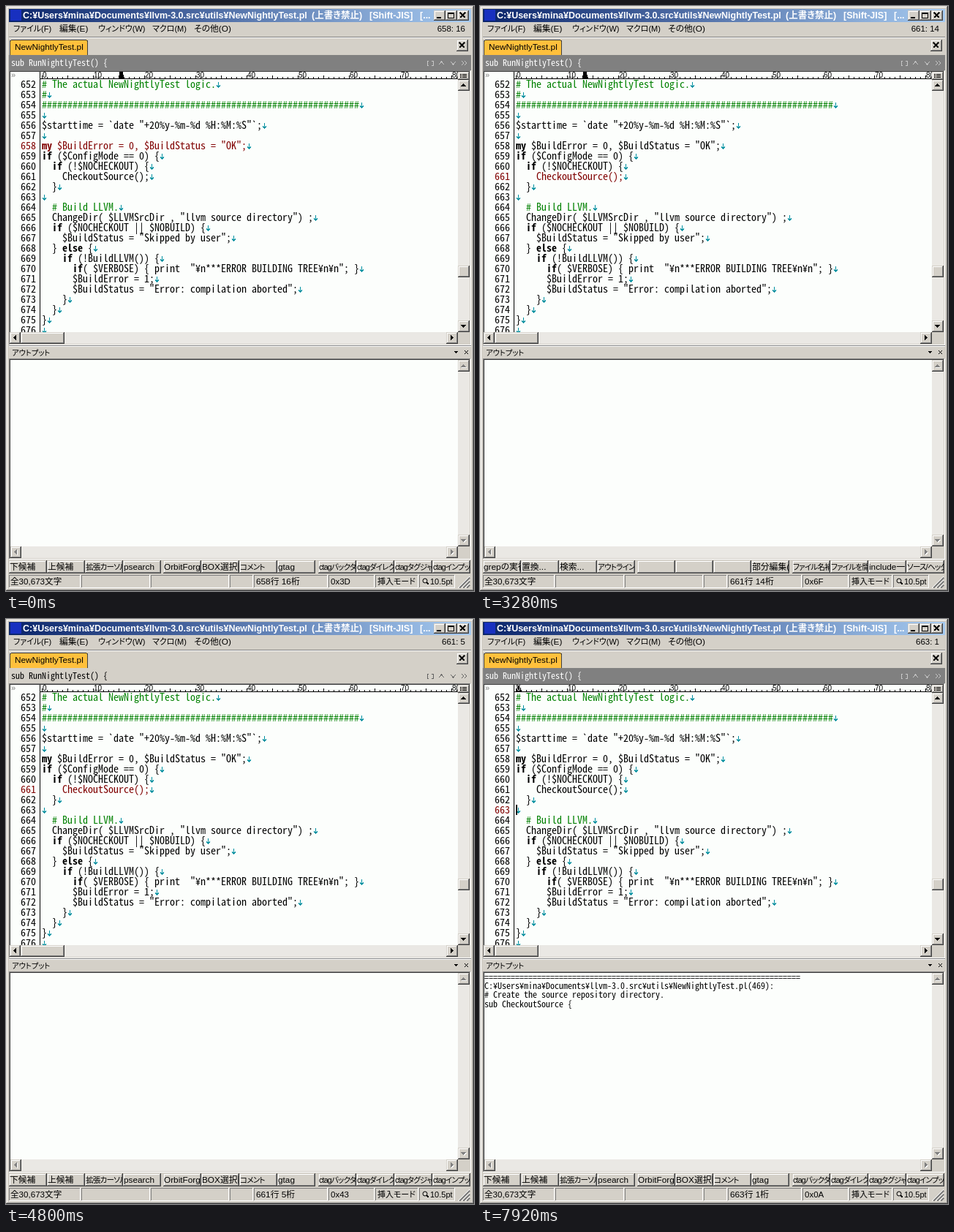
Write an HTML page that moves like this. It is 640 by 800 pixels and loops after 8 s.

```html
<!DOCTYPE html>
<html lang="ja">
<head>
<meta charset="utf-8">
<title>Editor</title>
<style>
html, body { margin: 0; width: 100%; height: 100%; overflow: hidden; background: #d4d0c8; }
svg { display: block; }
#stage { width: 640px; height: 800px; }
rect, path { shape-rendering: crispEdges; }
text { white-space: pre; font: 12px "Liberation Sans", "Noto Sans CJK JP", sans-serif; }
.ja { font-family: "Liberation Sans", "Noto Sans CJK JP", "Noto Sans CJK", sans-serif; font-feature-settings: "palt"; }
.tight { letter-spacing: -.8px; }
.code, .out { font-family: "Noto Sans Mono CJK JP", "Noto Sans Mono", monospace; }
.title { font-weight: bold; fill: #fff; }
.com { fill: #008000; }
.cur { fill: #800000; }
.b { font-weight: bold; }
</style>
</head>
<body>
<svg id="stage" viewBox="0 0 640 800"><g id="base"></g><g id="live"></g></svg>
<script>
const FACE = '#d4d0c8', PAPER = '#fcfefc', DARK = '#404040', MID = '#808080';
const FIRST = 652, TOP = 100, ROW = 14, LEFT = 49, COL = 7;

const CODE = [
  '# The actual NewNightlyTest logic.',
  '#',
  '#'.repeat(62),
  '',
  '$starttime = `date "+20%y-%m-%d %H:%M:%S"`;',
  '',
  'my $BuildError = 0, $BuildStatus = "OK";',
  'if ($ConfigMode == 0) {',
  '  if (!$NOCHECKOUT) {',
  '    CheckoutSource();',
  '  }',
  '',
  '  # Build LLVM.',
  '  ChangeDir( $LLVMSrcDir , "llvm source directory") ;',
  '  if ($NOCHECKOUT || $NOBUILD) {',
  '    $BuildStatus = "Skipped by user";',
  '  } else {',
  '    if (!BuildLLVM()) {',
  '      if( $VERBOSE) { print  "¥n***ERROR BUILDING TREE¥n¥n"; }',
  '      $BuildError = 1;',
  '      $BuildStatus = "Error: compilation aborted";',
  '    }',
  '  }',
  '}',
  ''
];
const FILE = 'C:¥Users¥mina¥Documents¥llvm-3.0.src¥utils¥NewNightlyTest.pl';
const OUTPUT = ['='.repeat(72), FILE + '(469):', '# Create the source repository directory.', 'sub CheckoutSource {'];
const KEYS = ['下候補', '上候補', '拡張カーソル', 'psearch', 'OrbitForg', 'BOX選択開始', 'コメント', 'gtag',
  'ctagバックタグ', 'ctagダイレクト', 'ctagタグジャンプ', 'ctagインプット'];
const CTRL_KEYS = ['grepの実行', '置換...', '検索...', 'アウトライン解析', '', '', '', '部分編集(P)',
  'ファイル名補完', 'ファイルを開く', 'include一覧', 'ソース/ヘッダ'];

// time, line, column, caret, extras: c = Ctrl held, s = selection, u = unfocused, o = output
const STEPS = [
  [0, 658, 16, 0, ''], [480, 658, 16, 1, ''], [1040, 658, 16, 0, ''], [1520, 658, 16, 1, ''],
  [2000, 658, 15, 1, ''], [2240, 658, 14, 1, ''], [2400, 659, 14, 1, ''], [2560, 660, 14, 1, ''],
  [2720, 661, 14, 1, ''], [3280, 661, 14, 0, 'c'], [3440, 661, 5, 1, 'cs'], [3520, 661, 5, 1, 's'],
  [3920, 661, 5, 0, 's'], [4400, 661, 5, 1, 's'], [4560, 661, 5, 1, ''], [4800, 661, 5, 0, 'u'],
  [4880, 661, 5, 0, 'uo'], [5040, 661, 5, 1, 'o'], [5600, 661, 5, 0, 'o'], [6080, 661, 5, 1, 'o'],
  [6640, 661, 5, 0, 'o'], [7040, 661, 5, 1, 'o'], [7600, 661, 5, 0, 'o'], [7680, 662, 4, 1, 'o'],
  [7920, 663, 1, 1, 'o']
];

const box = (x, y, w, h, fill) => `<rect x="${x}" y="${y}" width="${w}" height="${h}" fill="${fill}"/>`;
const path = (d, fill, stroke = 'none', w = 1) => `<path d="${d}" fill="${fill}" stroke="${stroke}" stroke-width="${w}"/>`;
const text = (x, y, s, cls = '', size = 12, fill = '') =>
  `<text x="${x}" y="${y}" class="${cls}" style="font-size:${size}px;${fill && 'fill:' + fill}">${s}</text>`;
const clip = (x, y, w, h, body) =>
  `<svg x="${x}" y="${y}" width="${w}" height="${h}" viewBox="${x} ${y} ${w} ${h}" overflow="hidden">${body}</svg>`;
const edge = (x, y, w, h, tl, br) =>
  box(x, y, w, 1, tl) + box(x, y, 1, h, tl) + box(x, y + h - 1, w, 1, br) + box(x + w - 1, y, 1, h, br);
const raised = (x, y, w, h) => box(x, y, w, h, FACE) +
  edge(x, y, w, h, FACE, DARK) + edge(x + 1, y + 1, w - 2, h - 2, '#fff', MID);
const sunk = (x, y, w, h) => edge(x, y, w, h, MID, '#fff');

// small triangle centred on x, y
const TRI = { u: 'm-4 2h7l-3.5-4z', d: 'm-4-2h7l-3.5 4z', l: 'm2-4v7l-4-3.5z', r: 'm-2-4v7l4-3.5z' };
function scrollButton(x, y, w, h, dir, off) {
  const cx = x + (w >> 1), cy = y + (h >> 1);
  return raised(x, y, w, h) + (off ? path(`M${cx + 1} ${cy + 1}` + TRI[dir], '#fff') : '') +
    path(`M${cx} ${cy}` + TRI[dir], off ? MID : '#000');
}

// sized so that each letter advances adv pixels
let monoRatio = .5;
const mono = (x, y, s, adv, cls, fill) => text(x, y, s, cls, adv / monoRatio, fill);

function frame() {
  let s = box(0, 0, 640, 800, FACE) + edge(0, 0, 640, 800, FACE, DARK) + edge(1, 1, 638, 798, '#fff', MID);
  s += '<defs><linearGradient id="bar"><stop stop-color="#0a246a"/><stop offset="1" stop-color="#a6caf0"/></linearGradient></defs>';
  s += box(4, 4, 632, 18, 'url(#bar)') + box(6, 5, 15, 15, '#1830c0');
  s += text(23, 17, FILE, 'title', 12.5) + text(418, 17, '(上書き禁止)', 'title ja', 12.5) +
    text(497, 17, '[Shift-JIS]', 'title', 12.6) + text(566, 17, '[...', 'title', 12.5);
  s += raised(585, 6, 16, 14) + raised(601, 6, 16, 14) + raised(617, 6, 16, 14);
  s += box(589, 15, 6, 2, '#000') + path('M604.5 9.5h8v7h-8zM604 10.5h9', 'none', '#000') +
    path('M621 9l7 7M628 9l-7 7', 'none', '#000', 1.6);
  [[10, 'ファイル(F)', 11], [73, '編集(E)', 11.8], [126, 'ウィンドウ(W)', 11], [200, 'マクロ(M)', 11], [257, 'その他(O)', 11.8]]
    .forEach(m => s += text(m[0], 35, m[1], 'ja', m[2]));
  // tab strip
  s += box(4, 42, 632, 1, MID) + box(4, 43, 632, 1, '#fff');
  s += path('M5 67V48l2-2h103l2 2v19z', '#ffc03c') + path('M5.5 67V48l2-1.5h102l2 1.5v19', 'none', DARK) +
    text(12, 60, 'NewNightlyTest.pl', '', 11.8);
  s += raised(616, 46, 16, 16) + path('M620 50l7 7M627 50l-7 7', 'none', '#000', 2);
  return s;
}

function ruler() {
  let s = box(6, 90, 612, 10, PAPER) + box(46, 99, 572, 1, '#000');
  for (let i = 0; i <= 81; i++) {
    const h = i % 5 ? 2 : 4;
    s += box(LEFT + i * COL, 99 - h, 1, h, '#000');
    if (i % 10 == 0) s += text(LEFT + 1 + i * COL, 98, i, '', 10);
  }
  return clip(6, 90, 612, 10, s) + text(7, 98, '»', '', 11, MID);
}

function panes() {
  let s = sunk(4, 88, 632, 376) + edge(5, 89, 630, 374, DARK, FACE) + box(6, 90, 612, 356, PAPER) + ruler();
  s += box(46, 90, 1, 356, '#000');
  // editor scrollbars
  s += box(618, 90, 16, 356, '#eae8e4') + raised(618, 90, 16, 11);
  for (let y = 93; y < 99; y += 2) s += box(621, y, 2, 1, '#000') + box(624, y, 6, 1, '#000');
  s += scrollButton(618, 101, 16, 15, 'u') + raised(618, 355, 16, 16) + scrollButton(618, 430, 16, 16, 'd');
  s += box(6, 446, 612, 16, '#eae8e4') + scrollButton(5, 446, 15, 16, 'l') + raised(20, 446, 60, 16) +
    scrollButton(602, 446, 16, 16, 'r') + box(618, 446, 16, 16, FACE);
  // output
  s += box(4, 464, 632, 1, MID) + box(4, 465, 632, 1, '#fff') + text(8, 478, 'アウトプット', 'ja', 10.3);
  s += path('M613 472h5l-2.5 3z', '#000') + path('M627 471l5 5M632 471l-5 5', 'none', '#000');
  s += sunk(4, 482, 632, 275) + edge(5, 483, 630, 273, DARK, FACE) + box(6, 484, 612, 255, PAPER);
  s += box(618, 484, 16, 255, '#eae8e4') + scrollButton(618, 484, 16, 16, 'u', 1) + scrollButton(618, 723, 16, 16, 'd', 1);
  s += box(6, 739, 612, 16, '#eae8e4') + scrollButton(6, 739, 15, 16, 'l', 1) + scrollButton(602, 739, 16, 16, 'r', 1) +
    box(618, 739, 16, 16, FACE);
  return s;
}

function statusBar() {
  let s = '';
  [[4, 98], [103, 94], [198, 107], [306, 32], [339, 101], [441, 63], [505, 59], [565, 49]]
    .forEach(c => s += sunk(c[0], 778, c[1], 18));
  s += text(6, 791, '全30,673文字', 'ja', 11.6) + text(508, 791, '挿入モード', 'ja', 11);
  s += '<circle cx="573" cy="786" r="3" fill="none" stroke="#000"/>' + path('M575 788l3 3', 'none', '#000', 1.5) +
    text(580, 791, '10.5pt', '', 11);
  for (let i = 0; i < 3; i++) {
    const d = 4 + i * 5;
    s += path(`M${634 - d} 796l${d}-${d}`, 'none', MID, 2) + path(`M${632 - d} 796l${d + 2}-${d + 2}`, 'none', '#fff');
  }
  return s;
}

function keyBar(labels) {
  return labels.map((s, i) => {
    const x = 4 + i * 52 + (i >> 2) * 3.5 | 0;
    const kana = (s.match(/[ァ-ー]/g) || []).length;
    const label = kana > 2 ? text(x + 1, 771, s, 'ja tight', 10.6) : text(x + 1, 771, s, 'ja', 11.8);
    return raised(x, 758, 52, 18) + clip(x + 1, 759, 50, 16, label);
  }).join('');
}

function codeRows(current) {
  let s = '';
  CODE.forEach((line, i) => {
    const n = FIRST + i, y = TOP + i * ROW, x = LEFT + line.length * COL;
    const comment = /^\s*#/.test(line);
    const cls = 'code' + (n == current ? ' cur' : comment ? ' com' : '');
    const body = comment ? line : line.replace(/\b(my|if|else)\b/g, '<tspan class="b">$1</tspan>');
    s += mono(20, y + 12, n, COL, 'code' + (n == current ? ' cur' : '')) + mono(LEFT, y + 12, body, COL, cls) +
      path(`M${x + 3.5} ${y + 4}v7M${x + 1} ${y + 8.5}l2.5 2.5l2.5-2.5`, 'none', '#0090a0');
  });
  return clip(6, TOP, 612, 346, s);
}

function view([, line, col, caret, extra]) {
  const has = f => extra.includes(f);
  const x = LEFT + (col - 1) * COL, y = TOP + (line - FIRST) * ROW;
  const sel = has('s'), blur = has('u');
  const ch = CODE[line - FIRST].charCodeAt(col - 1) || 10;
  const hex = '0x' + ch.toString(16).toUpperCase().padStart(2, '0');
  const ink = blur ? '#000' : '#fff', icon = blur ? '#606060' : '#c8c8c8';
  let s = box(4, 67, 632, 21, blur ? FACE : MID) + mono(7, 82, 'sub RunNightlyTest() {', 6, 'out', ink);
  s += path('M578 75h-2v6h2M582 75h2v6h-2M592 80l3.5-4l3.5 4M608 76l3.5 4l3.5-4M623 75l3 3l-3 3M627 75l3 3l-3 3', 'none', icon);
  s += `<text x="628" y="35" text-anchor="end" style="font-size:11.5px">${line}: ${col}</text>`;
  if (!blur) {
    s += path(`M${x} 99v-4l1-1v-4h5v4l1 1v4z`, '#000');
    if (col == 1) s += text(LEFT + 1, 98, '0', '', 10, '#fff');
  }
  s += codeRows(sel ? 0 : line);
  if (sel) s += box(77, 226, 98, ROW, '#0a246a') + mono(77, 238, 'CheckoutSource', COL, 'code', '#fff');
  if (caret) s += box(x, y, sel ? 1 : 2, ROW, sel ? '#f5db95' : '#000');
  if (has('o')) OUTPUT.forEach((row, i) => s += mono(6, 494 + i * 12.2, row, 6, 'out'));
  s += keyBar(has('c') ? CTRL_KEYS : KEYS);
  if (sel) s += text(105, 791, '1行選択', 'ja', 11.4) + text(200, 791, '14文字選択', 'ja', 11.8);
  return s + text(342, 791, `${line}行 ${col}桁`, 'ja', 11.8) + text(444, 791, hex, '', 11.5);
}

const pen = document.createElement('canvas').getContext('2d');
pen.font = '100px "Noto Sans Mono CJK JP", "Noto Sans Mono", monospace';
monoRatio = pen.measureText('0').width / 100;

const live = document.getElementById('live');
document.getElementById('base').innerHTML = frame() + panes() + statusBar();
let shown = null;
function tick() {
  const t = performance.now() % 8000;
  const step = STEPS.findLast(s => s[0] <= t);
  if (step != shown) live.innerHTML = view(shown = step);
  requestAnimationFrame(tick);
}
tick();
</script>
</body>
</html>
```
